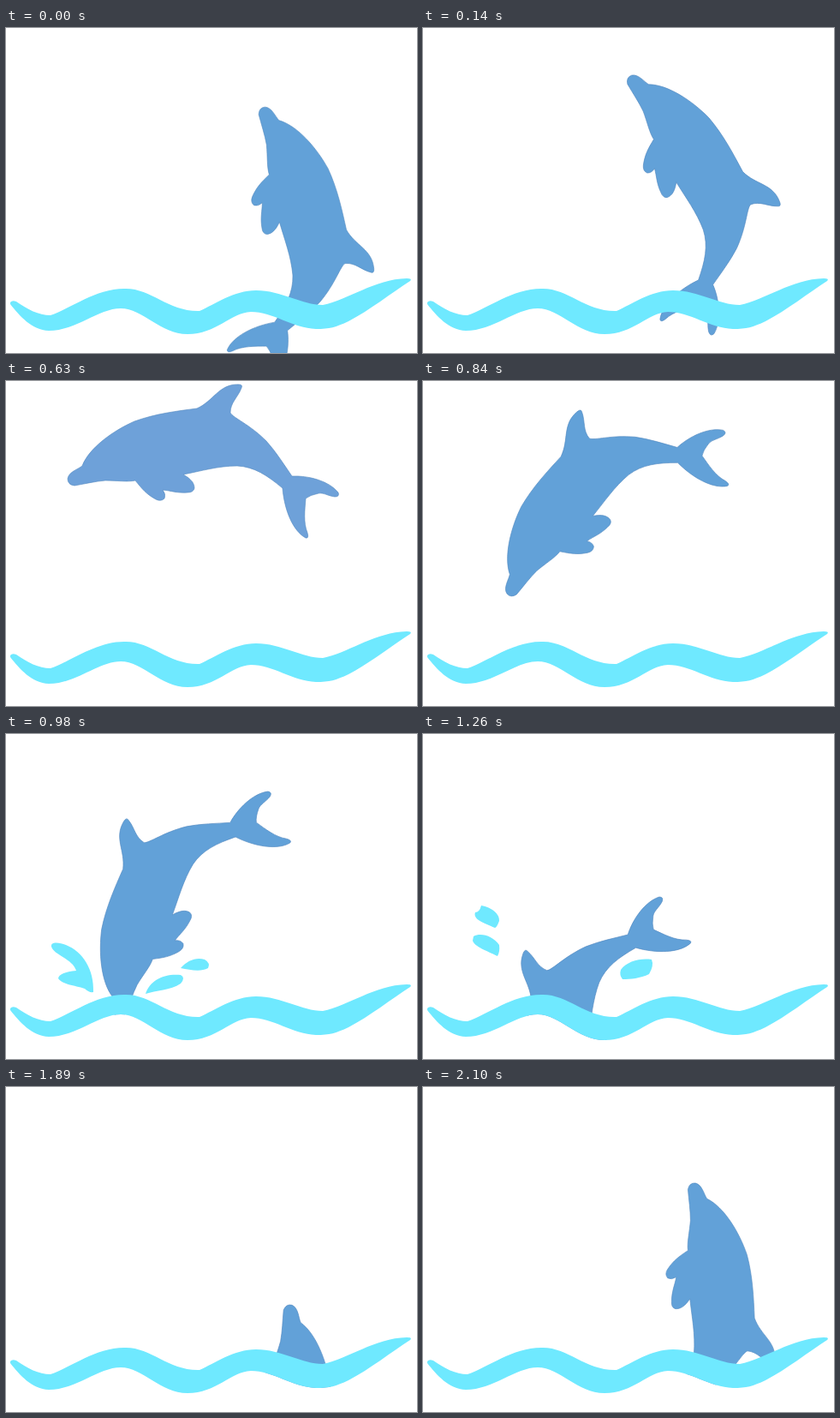
These frames come from a looping animation (480x379 px, 2170 ms). An HTML page:

```html
<!DOCTYPE html>
<html lang="en">
<head>
<meta charset="utf-8">
<title>Leaping dolphin</title>
<style>
  html, body { margin: 0; width: 100%; height: 100%; overflow: hidden; background: #fff; }
  svg { display: block; width: 100vw; height: 100vh; }
</style>
</head>
<body>
<svg viewBox="0 0 480 379" preserveAspectRatio="none">
  <defs><clipPath id="aboveWater"><path id="air"/></clipPath></defs>
  <g id="sea">
    <path id="dolphin" stroke="#5289c0" stroke-width=".6" d="M72 114C73 106 84 103 89 99C97 78 125 58 150 47C175 38 200 35 223 32
      C243 23 248 4 271 4Q277 4 275 8C271 19 262 25 262 37C265 43 284 50 304 70C315 82 325 98 334 111
      C352 110 377 116 388 130Q390 135 384 135C376 134 371 130 365 131Q355 133 350 137
      C349 150 347 165 352 177Q354 184 350 183C335 175 325 150 323 125C305 110 290 100 270 99
      C248 99 228 105 207 109C216 114 220 119 220 125Q219 130 212 130C200 131 193 128 183 127
      Q187 132 185 137Q181 141 175 138C164 132 159 126 151 116C142 118 130 116 116 116
      C104 117 92 120 80 122Q72 121 72 114Z"/>
  </g>
  <g fill="#6fe9ff">
    <path id="burst" d="M53 248C52 242 62 243 70 246C90 254 103 275 102 301Q97 302 92 297C80 293 65 292 61 285
      Q62 278 82 276C78 262 56 258 53 248ZM163 303C168 287 185 279 204 281Q210 284 204 291C192 299 175 299 163 303Z
      M204 273C212 264 222 260 232 263Q239 267 236 273C227 278 215 275 204 273Z"/>
    <path id="drops" d="M68 200C80 202 90 210 89 218Q86 226 84 226C70 220 58 216 61 208Q66 208 68 200Z
      M59 236C68 231 82 236 89 246Q90 254 87 259C75 253 60 248 58 241Z
      M231 275C238 265 254 261 267 263Q270 270 264 280C254 285 242 286 233 286Q229 281 231 275Z"/>
    <path id="wave"/>
  </g>
</svg>
<script>
const LOOP = 2170, STEP = 70;
const [sea, dolphin, burst, drops, wave, air] =
  ['sea', 'dolphin', 'burst', 'drops', 'wave', 'air'].map(id => document.getElementById(id));

const crest = 'M5 320Q7 317 12 319C25 328 38 335 52 335C76 327 106 303 140 304C170 304 190 331 226 330' +
  'C244 322 266 306 292 306C322 306 345 323 370 323C400 317 430 293 468 292Q475 292 472 295';
const underside = 'C450 309 425 329 400 342C385 349 378 351 362 351C335 350 312 331 286 331' +
  'C262 332 246 357 212 357C180 357 160 327 134 327C108 327 82 353 50 353C30 352 16 336 5 322';
wave.setAttribute('d', crest + underside + 'Z');
air.setAttribute('d', 'M0 0H480V290L472 295' + underside + 'L0 320Z');

// Leap keys: time, centre x, centre y, rotation
const leap = [
  [-280, 325, 400, 105],
  [-70, 335, 257, 94.8],
  [0, 344, 232, 84.9],
  [350, 251.6, 112, 46.8],
  [630, 215, 85, 0],
  [980, 177.9, 191.7, -58.8],
  [1120, 175.7, 264, -64.2],
  [1260, 173.4, 336.5, -69.6],
  [1540, 169, 481, -80]
];

function slope(i, c) {
  const rise = (p, q) => (q[c] - p[c]) / (q[0] - p[0]);
  const prev = leap[i - 1], key = leap[i], next = leap[i + 1];
  if (!prev) return rise(key, next);
  if (!next) return rise(prev, key);
  const before = key[0] - prev[0], after = next[0] - key[0];
  return (rise(prev, key) * after + rise(key, next) * before) / (before + after);
}

// Cubic Hermite through the leap keys
function poseAt(t) {
  let i = 0;
  while (i < leap.length - 2 && t >= leap[i + 1][0]) i++;
  const a = leap[i], b = leap[i + 1], dt = b[0] - a[0], u = (t - a[0]) / dt, v = 1 - u;
  return [1, 2, 3].map(c =>
    v * v * (1 + 2 * u) * a[c] + u * u * (3 - 2 * u) * b[c] +
    dt * u * v * (v * slope(i, c) - u * slope(i + 1, c)));
}

function show(el, on) { el.style.display = on ? '' : 'none'; }

function spread(el, k) {
  el.setAttribute('transform', `translate(133 305) scale(${k}) translate(-133 -305)`);
}

function draw(ms) {
  const t = Math.floor((ms % LOOP) / STEP) * STEP;
  show(dolphin, t < 1540 || t >= 1890);
  const [x, y, angle] = poseAt(t >= 1890 ? t - LOOP : t);
  dolphin.setAttribute('transform', `translate(${x} ${y}) rotate(${angle}) translate(-215 -85)`);
  dolphin.setAttribute('fill', t >= 210 && t < 840 ? '#6ea1d9' : '#62a1d8');
  // The tail still shows under the wave as the leap begins
  if (t < 350) sea.removeAttribute('clip-path');
  else sea.setAttribute('clip-path', 'url(#aboveWater)');

  show(burst, t >= 910 && t < 1190);
  spread(burst, t < 980 ? 0.65 : 1 + (t - 980) / 1000);
  show(drops, t >= 1190 && t < 1400);
  spread(drops, 1 + (t - 1260) / 1400);
}

const start = performance.now();
function tick() {
  draw(performance.now() - start);
  requestAnimationFrame(tick);
}
tick();
</script>
</body>
</html>
```
